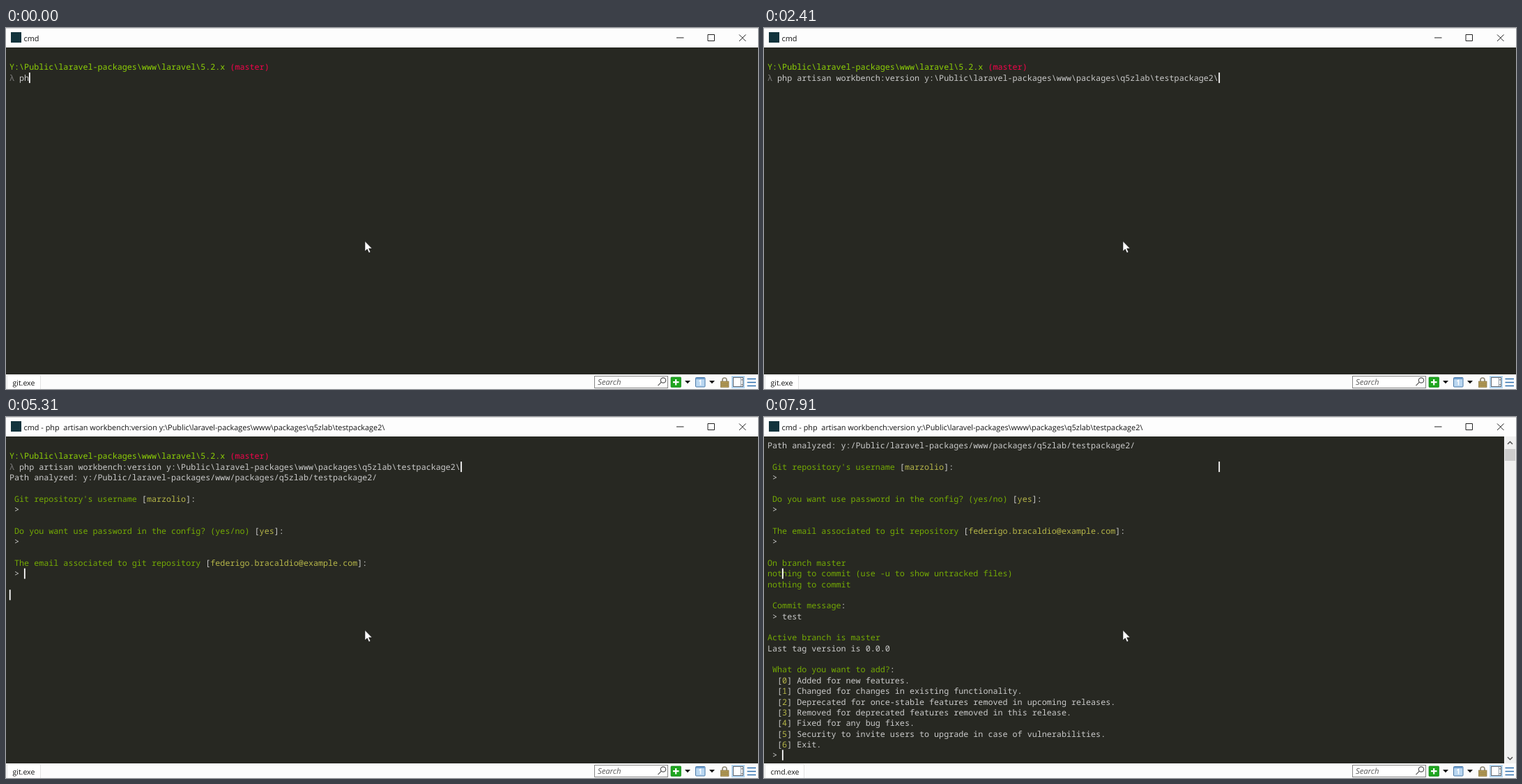
An HTML page for the animation above (8 s loop, 1079 px wide and 519 px high).

```html
<!DOCTYPE html>
<html lang="en">
<head>
<meta charset="utf-8">
<title>Terminal session</title>
<style>
  html, body { margin: 0; width: 100%; height: 100%; overflow: hidden; background: #272822; }
  svg { display: block; width: 1079px; height: 519px; }
  text { white-space: pre; text-rendering: geometricPrecision; }
  #screen text { font: 11.73px "Noto Sans Mono", "DejaVu Sans Mono", monospace; fill: #cacaca; }
  #screen .green { fill: #74aa04; }
  #screen .lime { fill: #8dd006; }
  #screen .red { fill: #f3044b; }
  #screen .yellow { fill: #b6b649; }
  #screen .gray { fill: #7c7c7c; }
  #carets rect { fill: #fff; }
  .ui { font: 10.9px "Open Sans", "Noto Sans", sans-serif; fill: #111; }
  .small { font-size: 10.5px; }
  .search { font-size: 11.3px; font-style: italic; fill: #5c5c5c; }
</style>
</head>
<body>
<svg viewBox="0 0 1079 519">
  <rect width="1079" height="519" fill="#272822"/>
  <g id="screen"></g>
  <g id="carets"></g>

  <g id="scrollbar">
    <path d="M1062 28h17v470h-17z" fill="#f0f0f0"/>
    <path d="M1063 46h15v17h-15z" fill="#cdcdcd"/>
    <path d="M1067 39l3.500-3.500 3.500 3.500M1067 489l3.500 3.500 3.500-3.500" fill="none" stroke="#505050" stroke-width="1.500"/>
  </g>

  <path d="M515 306.500v14.500l3.300-3.100 2.400 5.400 2.300-1-2.400-5.200h4.700z" fill="#fff" stroke="#111" stroke-width=".6"/>

  <!-- title bar -->
  <rect width="1079" height="28" fill="#fdfdfd"/>
  <rect width="1079" height="1" fill="#d8d8d8"/>
  <rect x="7" y="6" width="15" height="15" fill="#12333c"/>
  <text id="title" class="ui" x="25.500" y="18.500"></text>
  <path d="M962 14h10.500M1007 9.500h9.500v9h-9.500zM1052 9.500l9.500 9.500M1061.500 9.500l-9.500 9.500" fill="none" stroke="#222"/>

  <!-- status bar -->
  <rect y="498" width="1079" height="21" fill="#fcfcfc"/>
  <rect id="tabBox" x="1.500" y="499.500" height="22" fill="#fff" stroke="#e2e2e2"/>
  <text id="tab" class="ui small" x="9.500" y="513.800"></text>
  <rect x="844.500" y="500.500" width="105" height="17" fill="#fff" stroke="#858585"/>
  <text class="ui search" x="849" y="513">Search</text>
  <g fill="none" stroke="#555" stroke-width="1.200">
    <circle cx="943" cy="506.500" r="3.700"/>
    <path d="M940.300 509.200l-4.800 5"/>
  </g>
  <rect x="954" y="502" width="14.500" height="14.500" rx="1" fill="#1fa51f" stroke="#12831a" stroke-width=".7"/>
  <path d="M961.200 505v8.500M957 509.200h8.500" stroke="#fff" stroke-width="2.200"/>
  <path d="M974 507h8l-4 4.300zM1009 507h8l-4 4.300z" fill="#111"/>
  <rect x="989.500" y="502.500" width="13.500" height="13.500" rx="1" fill="#b9d6f0" stroke="#4878a8"/>
  <path d="M990 504h12.500" stroke="#6f9fce" stroke-width="2"/>
  <path d="M994.500 508l2-1.500v7" fill="none" stroke="#fff" stroke-width="1.500"/>
  <path d="M1028 509v-3a3 3 0 0 1 6 0v3" fill="none" stroke="#8f8a78" stroke-width="1.700"/>
  <rect x="1025.500" y="508" width="11.500" height="8.500" fill="#b39a56" stroke="#80703f" stroke-width=".7"/>
  <path d="M1026 511h10.500M1026 513.500h10.500" stroke="#8e7a43" stroke-width=".8"/>
  <rect x="1041" y="500" width="19" height="18" fill="#b5d7f2"/>
  <rect x="1043.500" y="502.500" width="14" height="13" fill="#fff" stroke="#5f6670"/>
  <path d="M1054.500 503v12" stroke="#8c96a0"/>
  <path d="M1056 505v1.500M1056 512v1.500" stroke="#444"/>
  <path d="M1063.500 504.500h12.500M1063.500 509.500h12.500M1063.500 514.500h12.500" stroke="#2c6fae" stroke-width="1.700"/>
</svg>

<script>
const LOOP = 8000, LEFT = 5, TOP = 33.4, CHAR = 7.038, PITCH = 15.35, BASELINE = 11.7;
const $ = id => document.getElementById(id);

const paint = name => s => `<tspan class="${name}">${s}</tspan>`;
const [green, lime, red, yellow, gray] = ['green', 'lime', 'red', 'yellow', 'gray'].map(paint);
const ask = (question, preset) => ` ${green(question)} [${yellow(preset)}]:`;

const target = 'y:\\Public\\laravel-packages\\www\\packages\\q5zlab\\testpackage2\\';
const runTitle = `cmd - php  artisan workbench:version ${target}`;

const choices = [
  'Added for new features.',
  'Changed for changes in existing functionality.',
  'Deprecated for once-stable features removed in upcoming releases.',
  'Removed for deprecated features removed in this release.',
  'Fixed for any bug fixes.',
  'Security to invite users to upgrade in case of vulnerabilities.',
  'Exit.'
];

const session = (command, answer) => [
  '',
  `${lime('Y:\\Public\\laravel-packages\\www\\laravel\\5.2.x')} ${red('(master)')}`,
  `${gray('λ')} ${command}`,
  `Path analyzed: ${target.replaceAll('\\', '/')}`,
  '',
  ask("Git repository's username", 'marzolio'),
  ' >',
  '',
  ask('Do you want use password in the config? (yes/no)', 'yes'),
  ' >',
  '',
  ask('The email associated to git repository', 'federigo.bracaldio@example.com'),
  ' >',
  '',
  green('On branch master'),
  green('nothing to commit (use -u to show untracked files)'),
  green('nothing to commit'),
  '',
  ` ${green('Commit message')}:`,
  ` > ${answer}`,
  '',
  green('Active branch is master'),
  'Last tag version is 0.0.0',
  '',
  ` ${green('What do you want to add?')}:`,
  ...choices.map((label, i) => `  [${yellow(i)}] ${label}`),
  ' >'
];

// Each burst: first key, last key, keystrokes (a long one is a tab completion).
const commandKeys = [
  [0, 0, 'ph'],
  [30, 810, 'p| |a|r|t|i|s|an| |w|o|r|k|b|en|c|h|:v|e|rs|io'],
  [840, 870, 'n| '],
  [930, 1600, 'y|:|\\|P|u|b|lic\\|l|a|r|avel-packages\\|w|w|w|\\'],
  [1650, 1890, 'p|a|c|k|a|ges\\'],
  [2040, 2120, 'q|5|zlab\\'],
  [2300, 2410, 't|e|s|tpackage2\\']
];
const answerKeys = [[6610, 6910, 't|e|s|t']];

function typed(bursts, t) {
  return bursts.map(([from, to, keys]) => {
    const parts = keys.split('|');
    const gap = (to - from) / Math.max(1, parts.length - 1);
    return parts.filter((_, i) => t >= from + i * gap - 0.01).join('');
  }).join('');
}

const steps = [
  [0, { rows: 3, scroll: 0, tab: 'git.exe', title: 'cmd', caret: null, stale: false }],
  [2620, { title: runTitle, tab: 'php.exe' }],
  [2710, { rows: 4 }],
  [2810, { rows: 7, caret: [3, 6] }],
  [2910, { caret: null }],
  [3110, { rows: 10, caret: [3, 9] }],
  [3310, { caret: null }],
  [3510, { caret: [3, 9] }],
  [3710, { caret: null }],
  [4510, { rows: 13, stale: true }],
  [4910, { rows: 14, caret: [0, 14] }],
  [5010, { tab: 'git.exe' }],
  [5110, { caret: null }],
  [5310, { caret: [0, 14] }],
  [5410, { caret: null }],
  [5510, { rows: 15 }],
  [5610, { tab: 'php.exe' }],
  [5810, { rows: 16, tab: 'git.exe' }],
  [5910, { rows: 17 }],
  [6010, { tab: 'php.exe' }],
  [6110, { rows: 20 }],
  [6310, { caret: [3, 19] }],
  [6510, { caret: null }],
  [6610, { caret: [3, 19] }],
  [7010, { rows: 22, caret: [0, 22] }],
  [7210, { caret: null, tab: 'git.exe' }],
  [7410, { caret: [0, 22], tab: 'php.exe' }],
  [7710, { rows: 23, caret: null, tab: 'git.exe' }],
  [7810, { rows: 33, scroll: 3, tab: 'php.exe' }],
  [7910, { caret: [3, 32], tab: 'cmd.exe' }]
];
const tabWidths = { 'git.exe': 48, 'php.exe': 54, 'cmd.exe': 56 };

const rowTop = row => TOP + row * PITCH;
const caretAt = (col, row) =>
  `<rect x="${LEFT + col * CHAR - 0.2}" y="${rowTop(row)}" width="1.8" height="15"/>`;

let shown = '';
function render(t) {
  const state = Object.assign({}, ...steps.filter(([at]) => t >= at).map(([, change]) => change));
  const command = typed(commandKeys, t), answer = typed(answerKeys, t);
  const key = JSON.stringify([state, command, answer]);
  if (key === shown) return;
  shown = key;

  $('screen').innerHTML = session(command, answer).slice(state.scroll, state.rows)
    .map((line, i) => `<text x="${LEFT}" y="${rowTop(i) + BASELINE}">${line}</text>`).join('');

  // Two carets stay behind at fixed screen positions.
  let carets = caretAt(2 + command.length, 2);
  if (state.stale) carets += caretAt(3, 12);
  if (state.caret) {
    const [col, row] = state.caret;
    carets += caretAt(row === 19 ? col + answer.length : col, row - state.scroll);
  }
  $('carets').innerHTML = carets;

  $('title').textContent = state.title;
  $('tab').textContent = state.tab;
  $('tabBox').setAttribute('width', tabWidths[state.tab]);
  $('scrollbar').style.display = state.scroll ? '' : 'none';
}

const start = performance.now();
function tick() {
  render((performance.now() - start) % LOOP);
  requestAnimationFrame(tick);
}
tick();
</script>
</body>
</html>
```
